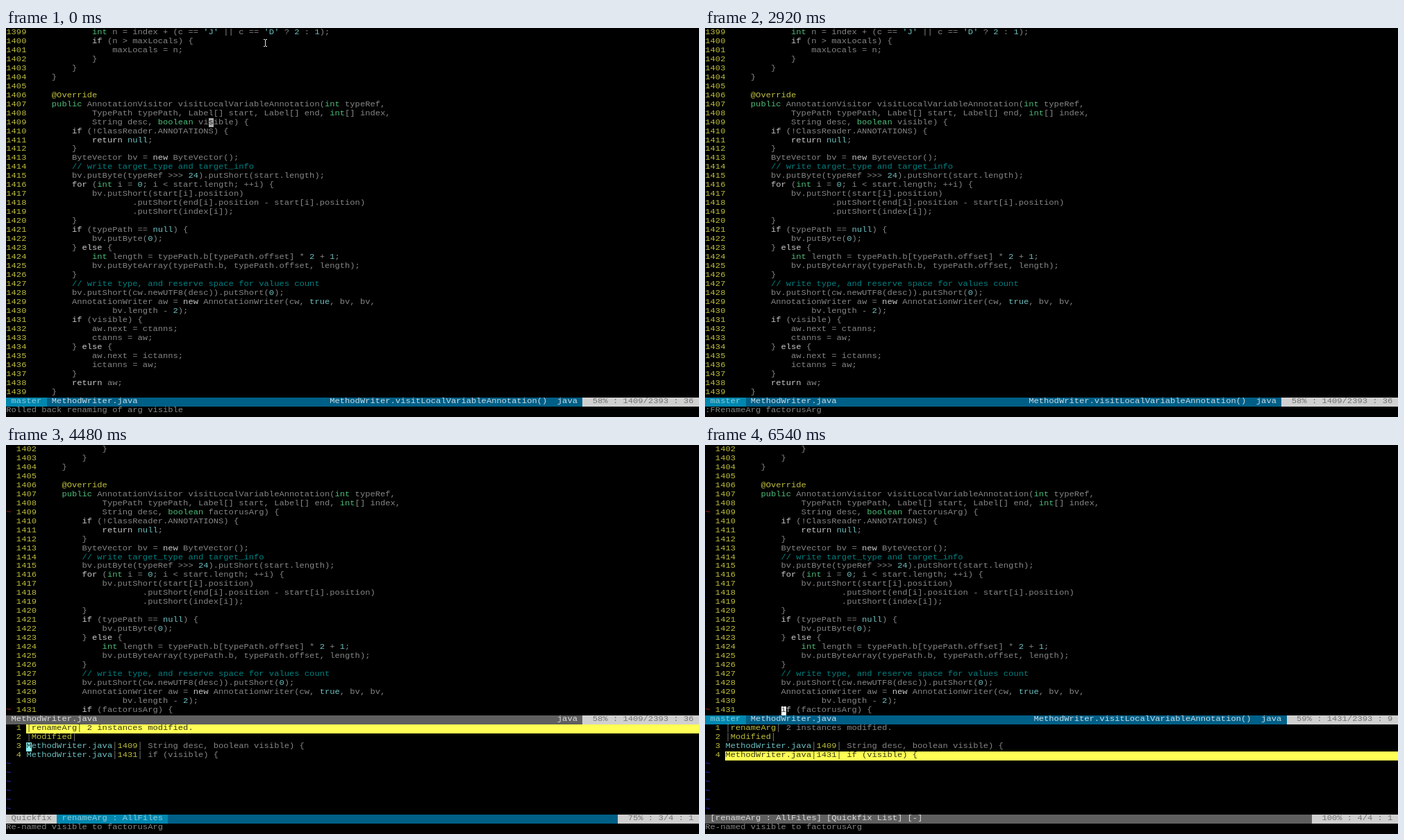
An HTML page with a canvas for the animation above (9860 ms loop, 998x561 px).

```html
<!DOCTYPE html>
<html lang="en">
<head>
<meta charset="utf-8">
<title>Rename argument</title>
<style>
html, body { margin: 0; width: 100%; height: 100%; overflow: hidden; background: #000; }
canvas { display: block; }
</style>
</head>
<body>
<canvas id="term" width="998" height="561"></canvas>
<script>
const ctx = document.getElementById('term').getContext('2d');
const LOOP = 9860, COLS = 137, CELL_W = 7.28, CELL_H = 12.975;
const FLAT = 0.87, INK = 0.78; // low, thin letterforms
const C = {
  text: '#aaaaaa', white: '#ffffff', yellow: '#f4f450', lit: '#ffff55', green: '#62f098',
  cyan: '#8cf5f5', note: '#00a5a5', sign: '#d02828', tilde: '#3a3aff',
  pale: '#d0d0d0', dim: '#585858', blue: '#005f87', sky: '#0087af', skyText: '#b4dfe8', idle: '#5f5f5f'
};

const FIRST = 1399;
const CODE = `            int n = index + (c == 'J' || c == 'D' ? 2 : 1);
            if (n > maxLocals) {
                maxLocals = n;
            }
        }
    }

    @Override
    public AnnotationVisitor visitLocalVariableAnnotation(int typeRef,
            TypePath typePath, Label[] start, Label[] end, int[] index,
            String desc, boolean visible) {
        if (!ClassReader.ANNOTATIONS) {
            return null;
        }
        ByteVector bv = new ByteVector();
        // write target_type and target_info
        bv.putByte(typeRef >>> 24).putShort(start.length);
        for (int i = 0; i < start.length; ++i) {
            bv.putShort(start[i].position)
                    .putShort(end[i].position - start[i].position)
                    .putShort(index[i]);
        }
        if (typePath == null) {
            bv.putByte(0);
        } else {
            int length = typePath.b[typePath.offset] * 2 + 1;
            bv.putByteArray(typePath.b, typePath.offset, length);
        }
        // write type, and reserve space for values count
        bv.putShort(cw.newUTF8(desc)).putShort(0);
        AnnotationWriter aw = new AnnotationWriter(cw, true, bv, bv,
                bv.length - 2);
        if (visible) {
            aw.next = ctanns;
            ctanns = aw;
        } else {
            aw.next = ictanns;
            ictanns = aw;
        }
        return aw;
    }`.split('\n');

const TOKENS = [
  [/^\/\/.*/, C.note],
  [/^@\w+/, C.yellow],
  [/^(public|int|boolean)\b/, C.green],
  [/^(if|else|for|new|return)\b/, C.white],
  [/^(null|true|\d+)\b|^'.'/, C.cyan],
  [/^\w+|^\s+|^./, C.text]
];

const colX = c => Math.round(c * CELL_W + 0.3);
const rowY = r => Math.round(r * CELL_H + 0.6);

function box(c0, c1, row, color) {
  const x = colX(c0), y = rowY(row);
  ctx.fillStyle = color;
  ctx.fillRect(x, y, (c1 === COLS ? 998 : colX(c1)) - x, rowY(row + 1) - y);
}

function put(col, row, str, color) {
  ctx.save();
  ctx.translate(0.3, row * CELL_H + 8.8);
  ctx.scale(1, FLAT);
  ctx.globalAlpha = INK;
  ctx.fillStyle = color;
  [...str].forEach((ch, i) => {
    if (ch !== ' ') ctx.fillText(ch, (col + i) * CELL_W, 0);
  });
  ctx.restore();
}

function cursor(col, row, ch, back, ink = '#000') {
  box(col, col + 1, row, back);
  put(col, row, ch, ink);
}

function codeLine(col, row, line) {
  while (line) {
    for (const [re, color] of TOKENS) {
      const m = re.exec(line);
      if (!m) continue;
      put(col, row, m[0], color);
      col += m[0].length;
      line = line.slice(m[0].length);
      break;
    }
  }
}

function buffer(skip, rows, renamed) {
  const left = renamed ? 2 : 0;
  for (let r = 0; r < rows; r++) {
    const line = CODE[r + skip];
    put(left, r, String(FIRST + skip + r), C.yellow);
    codeLine(left + 5, r, renamed ? line.replace('visible', 'factorusArg') : line);
    if (renamed && line.includes('visible')) put(0, r, '~', C.sign);
  }
}

// Right-aligned position field; returns its first column.
function ruler(row, str) {
  const start = COLS - 3 - str.length;
  box(start, COLS, row, C.pale);
  put(start + 2, row, str, C.dim);
  return start;
}

function fileBar(row, active, pos) {
  box(0, COLS, row, active ? C.blue : C.idle);
  const end = ruler(row, pos);
  put(end - 5, row, 'java', C.white);
  if (active) {
    box(0, 8, row, C.sky);
    put(1, row, 'master', C.skyText);
    put(end - 50, row, 'MethodWriter.visitLocalVariableAnnotation()', C.white);
  }
  put(active ? 9 : 1, row, 'MethodWriter.java', C.white);
}

const BAR = '│';
const ITEMS = [
  ['', 'renameArg', ' 2 instances modified.'],
  ['', 'Modified', ''],
  ['MethodWriter.java', '1409', ' String desc, boolean visible) {'],
  ['MethodWriter.java', '1431', ' if (visible) {']
];

function quickfix(lit, line, active) {
  ITEMS.forEach(([file, tag, rest], i) => {
    const row = 31 + i, on = lit === i + 1;
    if (on) box(4, COLS, row, C.lit);
    put(2, row, String(i + 1), C.yellow);
    let col = 4;
    const part = (str, color) => {
      put(col, row, str, on ? '#000' : color);
      col += str.length;
    };
    part(file, C.cyan);
    part(BAR, C.text);
    part(tag, C.yellow);
    part(BAR, C.text);
    part(rest, C.text);
    if (active && line === i + 1) {
      const ch = file[0] || BAR;
      if (on) cursor(4, row, ch, '#000', C.lit);
      else cursor(4, row, ch, file ? C.cyan : C.text);
    }
  });
  for (let r = 35; r < 41; r++) put(0, r, '~', C.tilde);

  box(0, COLS, 41, active ? C.blue : C.idle);
  if (active) {
    box(0, 10, 41, C.pale);
    put(1, 41, 'Quickfix', C.dim);
    box(10, 32, 41, C.sky);
    put(11, 41, 'renameArg : AllFiles', C.skyText);
  } else {
    put(1, 41, '[renameArg : AllFiles] [Quickfix List] [-]', C.white);
  }
  ruler(41, `${line * 25}% : ${line}/4 : 1`);
}

function pointer() {
  ctx.fillStyle = '#e8e8e8';
  ctx.fillRect(373, 17, 1, 9);
  for (const y of [16, 26]) {
    ctx.fillRect(371, y, 2, 1);
    ctx.fillRect(374, y, 2, 1);
  }
}

function full(msg, renamed) {
  buffer(0, 41, renamed);
  fileBar(41, true, AT36);
  put(0, 42, msg, C.text);
}

function typing(cmd) {
  full(cmd, false);
  cursor(cmd.length, 42, ' ', C.text);
}

function split(lit, line, active, pos) {
  buffer(3, 30, true);
  fileBar(30, !active, pos);
  quickfix(lit, line, active);
  put(0, 42, DONE, C.text);
}

const UNDONE = 'Rolled back renaming of arg visible';
const DONE = 'Re-named visible to factorusArg';
const COMMAND = ':FRenameArg factorusArg';
const AT36 = '58% : 1409/2393 : 36', AT13 = '58% : 1409/2393 : 13';

const STEPS = [
  [0, () => { full(UNDONE, false); cursor(40, 10, 's', C.text); pointer(); }],
  [1390, () => { full(UNDONE, false); cursor(40, 10, 's', C.text); }],
  [1460, () => typing(':')],
  [1730, () => typing(':F')],
  [1900, () => typing(':FRollback')],
  [2480, () => typing(COMMAND)],
  [2920, () => full(COMMAND, false)],
  [3070, () => full(COMMAND, true)],
  [3180, () => { full(DONE, true); cursor(2, 32, '1', C.lit); }],
  [3630, () => split(1, 1, true, AT36)],
  [4210, () => split(1, 2, true, AT36)],
  [4480, () => split(1, 3, true, AT36)],
  [4990, () => { split(3, 3, false, AT13); cursor(19, 7, 'S', C.text); }],
  [6010, () => split(3, 3, true, AT13)],
  [6250, () => split(3, 4, true, AT13)],
  [6540, () => { split(4, 4, false, '59% : 1431/2393 : 9'); cursor(15, 29, 'i', C.white); }]
];

let shown = -1;
function frame() {
  const t = performance.now() % LOOP;
  const step = STEPS.findLastIndex(([at]) => t >= at);
  if (step !== shown) {
    shown = step;
    ctx.fillStyle = '#000';
    ctx.fillRect(0, 0, 998, 561);
    ctx.font = '12.13px "Liberation Mono", monospace';
    STEPS[step][1]();
  }
  requestAnimationFrame(frame);
}
frame();
</script>
</body>
</html>
```
